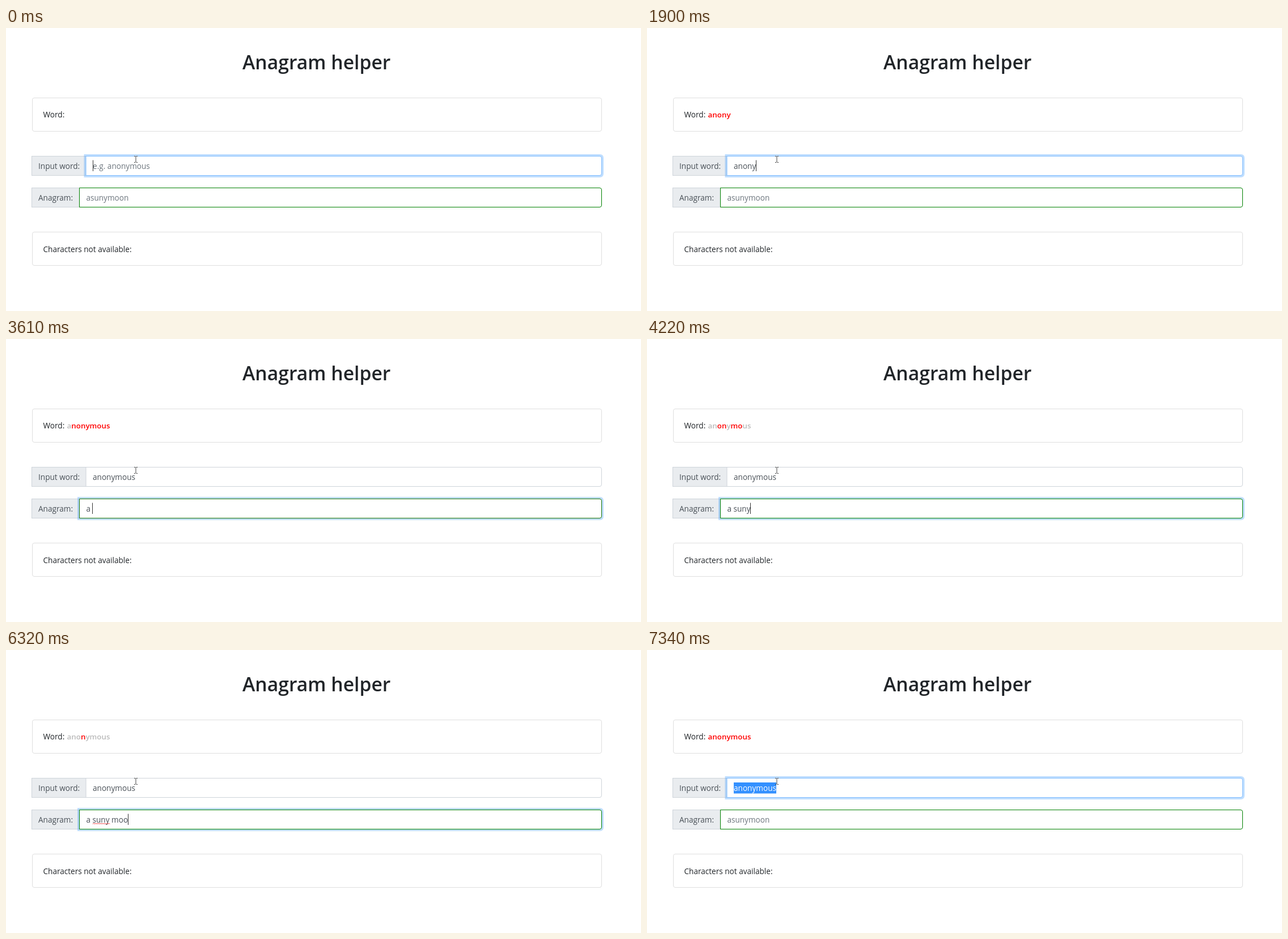
Write an HTML page that moves like this. It is 1120 by 500 pixels and loops after 8000 ms.

```html
<!DOCTYPE html>
<html lang="en">
<head>
<meta charset="utf-8">
<title>Anagram helper</title>
<style>
html, body { margin: 0; width: 100%; height: 100%; overflow: hidden; background: #fff; }
svg { display: block; font: 13.6px "Open Sans", "Noto Sans", sans-serif; }
text { white-space: pre; fill: #212529; }
.title { font-size: 33.7px; font-weight: 600; }
.card { fill: #fff; stroke: #dfdfdf; }
.label { fill: #e9ecef; stroke: #ced4da; }
.muted { fill: #495057; }
.ring { fill: none; stroke: #007bff; }
.box { fill: #fff; }
#word { font-size: 13.35px; font-weight: 600; }
</style>
</head>
<body>
<svg width="1120" height="500" viewBox="0 0 1120 500">
  <text class="title" x="417" y="73">Anagram helper</text>
  <rect class="card" x="46.5" y="123.5" width="1004" height="59" rx="3.5"/>
  <text x="65.5" y="158">Word:</text>
  <text id="word" x="107.5" y="158"></text>
  <rect class="label" x="45.5" y="226.5" width="96" height="34"/>
  <text class="muted" x="57" y="249">Input word:</text>
  <rect class="label" x="45.5" y="282.5" width="84" height="34"/>
  <text class="muted" x="57" y="305">Anagram:</text>
  <g id="fields"></g>
  <path id="squiggle" fill="none" stroke="#e33" stroke-width="1"/>
  <rect class="card" x="46.5" y="360.5" width="1004" height="59" rx="3.5"/>
  <text x="65.5" y="396">Characters not available:</text>
  <path fill="none" stroke="#444" d="M226 226.5h2l1 1l1 -1h2M226 237.5h2l1 -1l1 1h2M229 227.5v9"/>
</svg>
<script>
const LOOP = 8000;
const WORD = 'anonymous';
const $ = id => document.getElementById(id);

// Each step: [start time, value]
const inputSteps = [[0, 0], [1270, 1], [1360, 2], [1500, 3], [1730, 4], [1900, 5],
  [2060, 6], [2130, 7], [2440, 8], [2510, 9]];
const anagramSteps = [[0, ''], [3380, 'a'], [3550, 'a '], [3710, 'a s'], [3870, 'a su'],
  [4070, 'a sun'], [4220, 'a suny'], [4530, 'a suny '], [4760, 'a suny m'],
  [4920, 'a suny mo'], [5080, 'a suny moo'], [5220, 'a suny moon'], [6110, 'a suny moo'],
  [6560, 'a suny '], [6720, 'a '], [6850, '']];
const errorSteps = [[0, 0], [3550, .1], [3630, .6], [3710, .9], [3790, .3], [3870, 0],
  [4530, .1], [4610, .6], [4690, 1], [4760, .9], [4840, .2], [4920, 0],
  [6560, .1], [6640, .6], [6720, 1], [6850, .5], [6920, 0]];
const focusSteps = [[0, 0], [2920, .15], [3020, .5], [3070, 1], [7180, .85], [7260, .5], [7340, 0]];
const caretSteps = [[0, 1], [440, 0], [880, 1], [5770, 0], [6320, 1], [7180, 0]];

const at = (steps, t) => steps.findLast(s => s[0] <= t)[1];
const mix = (a, b, p) => `rgb(${a.map((v, i) => Math.round(v + (b[i] - v) * p))})`;

function add(parent, tag, attrs) {
  const el = document.createElementNS('http://www.w3.org/2000/svg', tag);
  for (const k in attrs) el.setAttribute(k, attrs[k]);
  return parent.appendChild(el);
}

function makeField(left, top, textX, hint) {
  const g = add($('fields'), 'g', {});
  const d = `M${left} ${top}H1047q3.5 0 3.5 3.5v27q0 3.5 -3.5 3.5H${left}Z`;
  const ring = add(g, 'path', { d, class: 'ring' });
  const box = add(g, 'path', { d, class: 'box' });
  const mark = add(g, 'rect', { x: textX, y: top + 7.5, height: 19.5, fill: '#3390ff' });
  const text = add(g, 'text', { x: textX, y: top + 22.5 });
  const caret = add(g, 'rect', { y: top + 7, width: 1, height: 19.5, fill: '#333' });
  return (value, focus, border, caretOn, selected) => {
    ring.setAttribute('stroke-width', 1 + 6 * focus);
    ring.setAttribute('stroke-opacity', .25 * focus);
    box.setAttribute('stroke', border);
    text.textContent = value;
    const width = value ? text.getComputedTextLength() : 0;
    if (!value) text.textContent = hint;
    text.style.fill = selected ? '#fff' : value ? '#495057' : '#6c757d';
    mark.setAttribute('width', selected ? width : 0);
    caret.setAttribute('x', Math.floor(textX + width));
    caret.setAttribute('opacity', caretOn ? 1 : 0);
  };
}

const drawInput = makeField(141, 226.5, 153, 'e.g. anonymous');
const drawAnagram = makeField(129.5, 282.5, 141.4, 'asunymoon');
const letters = [...WORD].map(c => {
  const span = add($('word'), 'tspan', {});
  span.textContent = c;
  return span;
});
$('squiggle').setAttribute('d', 'M153 307.5' + 'l1.5 -1.5l1.5 1.5'.repeat(10));

function draw(t) {
  const typed = at(inputSteps, t);
  const anagram = at(anagramSteps, t);
  const focus = at(focusSteps, t);
  const caret = at(caretSteps, t);
  const inAnagram = t >= 2920 && t < 7180;

  const used = new Set();
  for (const c of anagram) {
    const i = letters.findIndex((s, k) => s.textContent === c && !used.has(k));
    if (i >= 0) used.add(i);
  }
  letters.forEach((s, i) => {
    s.style.display = i < typed ? '' : 'none';
    s.style.fill = used.has(i) ? '#bbb' : '#f00';
  });

  drawInput(WORD.slice(0, typed), 1 - focus,
    mix([128, 189, 255], [206, 212, 218], focus), caret && !inAnagram, t >= 7180);
  drawAnagram(anagram, focus, mix([0, 128, 0], [255, 0, 0], at(errorSteps, t)),
    caret && inAnagram, false);
  $('squiggle').style.display = anagram.startsWith('a suny ') ? '' : 'none';
}

function tick() {
  draw(performance.now() % LOOP);
  requestAnimationFrame(tick);
}
tick();
</script>
</body>
</html>
```
